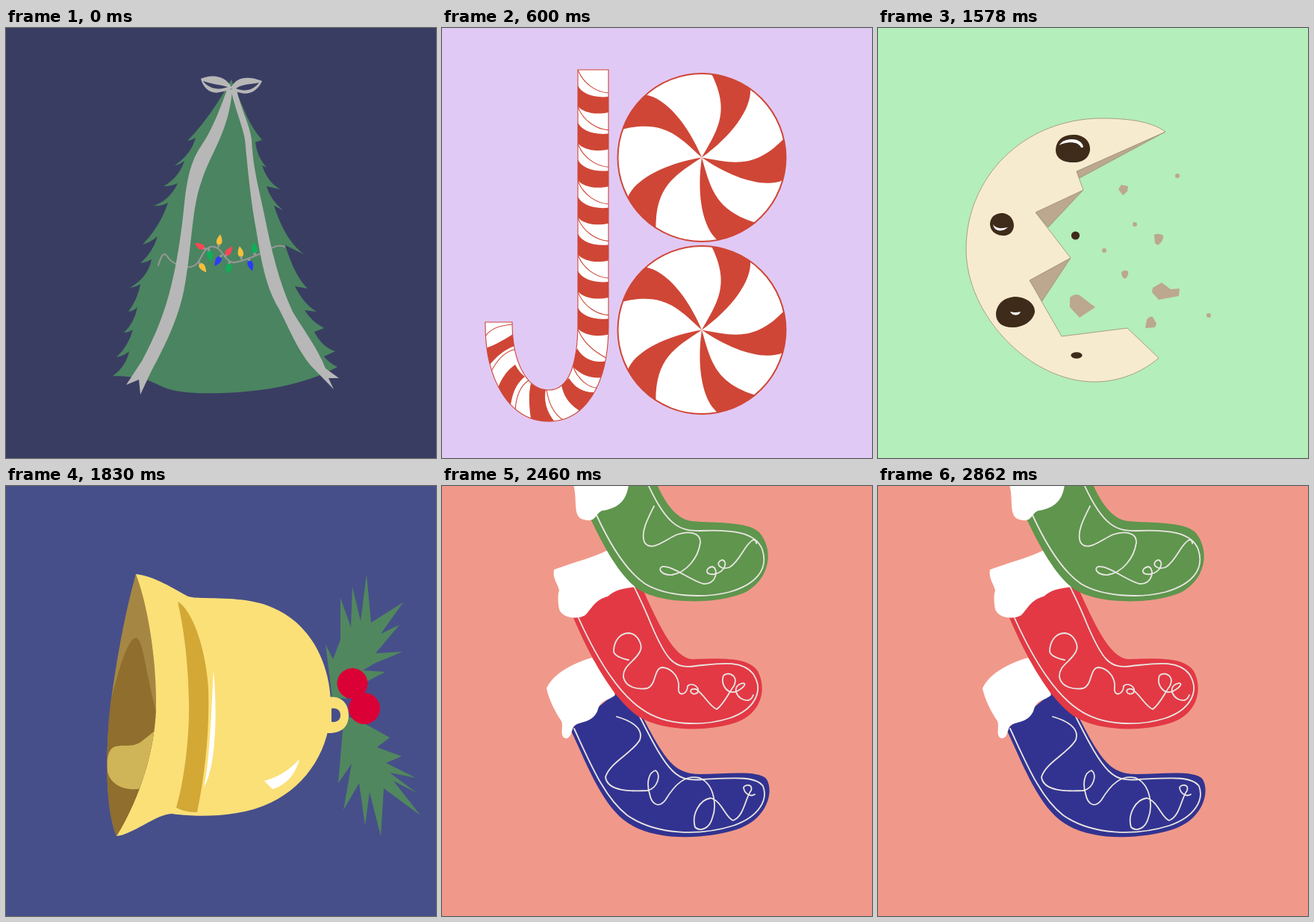
An HTML page that plays this animation: 576 px wide and 576 px high, repeating every 3.13 s.

```html
<!DOCTYPE html>
<html lang="en">
<head>
<meta charset="utf-8">
<title>Holiday cards</title>
<style>
html, body { margin: 0; width: 100%; height: 100%; overflow: hidden; }
svg { display: block; width: 576px; height: 576px; }
.scene { visibility: hidden; }
.scene:first-of-type { visibility: visible; }
.bg { width: 576px; height: 576px; }
.line { fill: none; stroke-linecap: round; stroke-linejoin: round; }
#tree .line { stroke: #979797; stroke-width: 2; }
#candy { fill: #cf4636; stroke: #cf4636; stroke-width: 0; }
#candy .line, #outline { stroke-width: 1.1; }
#socks .line { stroke: #e9e6e2; stroke-width: 1.8; }
</style>
</head>
<body>
<svg viewBox="0 0 576 576">
  <g class="scene" id="tree">
    <rect class="bg" fill="#393d62"/>
    <path fill="#4b8460" d="M302 69L292 86Q268 126 243 151Q249 150 254 147Q248 169 226 184Q233 183 239 178Q232 200 211 212Q221 212 230 208Q219 231 198 238Q209 239 217 234Q207 265 183 290Q194 287 203 279Q197 300 180 315Q188 314 195 310Q190 334 166 348Q174 347 180 343Q177 362 164 380Q171 379 176 374Q172 395 158 408Q164 408 170 404Q164 426 148 441Q158 439 165 433Q161 453 143 466C170 467 185 468 204 478C225 489 255 490 290 489C345 487 400 478 444 454Q433 449 426 440L441 433Q424 428 413 407L426 402Q409 393 400 378L416 380Q399 370 387 346L404 349Q387 333 374 291L399 303Q374 285 359 238L371 244Q354 230 349 212L367 216Q350 206 343 184L349 187Q336 172 334 153L343 150Q331 136 323 119L304 75Z"/>
    <path class="line" d="M204 318C208 305 211 299 216 306C222 316 238 321 248 320C262 317 261 297 274 293C290 291 291 312 304 314C315 314 328 307 342 302C355 296 361 289 373 293"/>
    <g id="bulbs"></g>
    <g fill="#b7b7b7">
      <path d="M297 80C288 105 277 135 262 157C246 180 243 205 240 225C236 265 231 305 222 342C214 378 199 415 182 446L161 478L178 471L180 491L193 463C215 422 233 385 240 342C249 290 249 240 262 205C275 165 298 140 303 84Z"/>
      <path d="M301 82C310 120 321 140 321 160C325 200 328 232 335 270C343 320 350 350 365 375C381 406 390 430 408 452L439 484L432 469L446 469L428 456C418 430 399 405 384 380C365 340 354 290 346 250C340 220 331 190 329 150C327 130 313 105 309 82Z"/>
      <path d="M302 79C294 64 276 61 261 68C264 81 275 89 286 86C294 85 298 83 302 81C320 94 336 87 343 71C325 64 309 65 302 79Z"/>
    </g>
    <path fill="#393d62" d="M264 71C274 75 288 76 297 79C285 84 271 81 264 71ZM308 81C318 74 329 76 339 73C332 83 320 86 308 81Z"/>
  </g>

  <g class="scene" id="candy">
    <rect class="bg" fill="#e1c9f5"/>
    <clipPath id="cane"><path id="outline" d="M182 56H223V400C223 480 190 527 143 527C90 527 57 470 58 394H94C94 450 115 485 143 485C170 485 182 450 182 394Z"/></clipPath>
    <g clip-path="url(#cane)">
      <rect class="bg" fill="#fff"/>
      <g id="stripes"></g>
      <path d="M181 429C190 445 205 449 221 446L216 468C200 470 185 465 174 452ZM170 469C178 482 190 489 206 488L186 514C172 505 163 495 160 478ZM119 476Q129 484 139 484C136 500 140 515 153 530H120C116 505 116 490 119 476ZM98 451Q104 462 111 467C98 478 94 490 91 512L72 490C78 472 85 460 98 451ZM55 430C72 425 85 416 97 409V426C85 430 72 440 60 456Z"/>
      <path class="line" d="M58 413C65 402 80 398 95 397M65 462C74 443 85 433 99 430M98 513C99 495 104 480 116 472M140 484C143 505 150 517 162 525M161 479C167 495 177 505 190 507M175 452C182 472 198 483 210 482"/>
    </g>
    <use href="#outline" fill="none"/>
    <g id="mints"></g>
  </g>

  <g class="scene" id="cookie">
    <rect class="bg" fill="#b4eeba"/>
    <g fill="#bca78f">
      <path d="M385 139L266 192L270 201ZM275 217L211 247L228 267ZM258 308L203 338L219 367Z" stroke="#9c8e78" stroke-width=".8"/>
      <path d="M322 216L326 210L335 212L334 219L328 224ZM370 277Q376 274 382 278Q383 285 375 291L371 288ZM326 327Q330 323 335 326Q336 332 331 336Q326 334 326 327ZM368 348L380 341L392 350L404 349L403 359L376 364L367 354ZM257 361Q264 355 270 358L291 374L270 388L257 374ZM360 391Q363 386 368 387L373 396L371 401L358 402Z"/>
      <circle cx="401" cy="198" r="3"/><circle cx="344" cy="263" r="3"/>
      <circle cx="303" cy="298" r="3"/><circle cx="443" cy="385" r="3"/>
    </g>
    <path fill="#f7ebcf" stroke="#a1977f" stroke-width=".9" d="M385 139C365 124 330 121 300 121C195 121 118 200 118 296C118 385 204 474 290 474C325 474 355 460 376 442L334 402L246 413L203 338L258 308L211 247L275 217L266 192Z"/>
    <g fill="#3e2b1a">
      <path d="M238 163C239 148 250 143 262 143C276 143 285 152 284 164C282 176 272 181 258 180C245 179 238 173 238 163ZM150 262C151 252 158 248 167 248C177 249 182 257 182 265C181 275 174 279 166 278C156 277 150 271 150 262ZM158 383C159 369 170 360 185 360C200 361 211 370 210 381C207 393 195 401 180 401C166 401 158 394 158 383Z"/>
      <circle cx="264.5" cy="278" r="5.6"/><ellipse cx="266" cy="438.5" rx="7.6" ry="4.2"/>
    </g>
    <path fill="#fff" d="M243 157C247 147 272 145 275 159Q274 161 272 160C268 151 252 152 243 157ZM154 263C158 269 166 269 174 267C168 273 156 274 154 263ZM177 380Q184 382 191 380C189 386 180 386 177 380Z"/>
  </g>

  <g class="scene" id="bell">
    <rect class="bg" fill="#474f8a"/>
    <path fill="#51875e" d="M437 284L428 212L438 232L448 206L448 150L462 189L464 135L475 181L483 118L489 183L532 156L502 198L527 186L495 224L531 222L493 238L478 247L508 249L483 262L455 285ZM452 316L445 398L463 372L452 434L473 398L481 455L487 410L502 469L506 405L555 441L519 395L550 411L514 384L549 391L509 371L530 362L497 350L514 337L480 318L456 308Z"/>
    <g fill="#db0035"><circle cx="464" cy="264.5" r="20.5"/><circle cx="480" cy="298" r="21"/></g>
    <g fill="#fbe078">
      <path d="M174 118C200 121 225 138 244 148C260 153 310 146 350 160C410 182 435 240 435 295C435 350 405 400 355 424C310 446 250 443 222 439C200 440 170 467 148 469Z"/>
      <path fill-rule="evenodd" d="M430 283C450 280 459 292 459 307C459 322 450 332 430 331ZM436 298V316C445 317 448 312 448 307C448 302 445 297 436 298Z"/>
    </g>
    <clipPath id="mouth"><path d="M174 118C190 160 201 230 201 290C201 345 183 412 148 469C132 430 133 350 141 285C148 235 158 175 174 118Z"/></clipPath>
    <g clip-path="url(#mouth)">
      <rect x="130" y="110" width="80" height="365" fill="#a58743"/>
      <path fill="#8f6e2e" d="M141 285C150 250 162 208 172 204C184 197 187 255 202 305V475H125V300Z"/>
      <path fill="#cfb557" d="M146 349C158 346 168 350 179 344L202 326V400L182 405C160 410 139 400 136 382C134 366 137 352 146 349Z"/>
    </g>
    <path fill="#d3a835" d="M230 155C245 162 266 205 271 270C273 330 266 390 256 437Q240 437 228 431C240 390 246 330 245 290C244 240 240 200 230 155Z"/>
    <path fill="#fff" d="M278 247C283 300 282 375 265 404C273 370 275 300 278 247ZM393 366C378 382 362 391 346 395L357 406C375 401 388 386 393 366Z"/>
  </g>

  <g class="scene" id="socks">
    <rect class="bg" fill="#f0998a"/>
    <g>
      <path fill="#323391" d="M172 326C192 368 212 422 243 447C280 477 350 474 395 460C435 447 445 410 435 393C425 380 380 386 345 386C312 385 300 370 268 308L232 278Z"/>
      <path class="line" d="M177 325C198 370 217 417 248 441C287 468 345 469 390 455C425 443 437 420 430 402C420 388 390 391 350 393C315 396 305 390 262 303M234 309C255 315 270 325 265 340C255 358 225 370 219 390C222 410 255 409 275 408C289 405 294 386 286 381C276 384 274 399 278 412C281 428 291 431 299 421C313 398 326 387 345 391C366 400 368 430 362 445C358 460 345 463 339 457C334 440 345 420 360 418C375 422 380 445 390 448C405 442 406 418 414 408C417 398 405 400 404 404C405 412 413 417 419 413"/>
      <path fill="#fff" d="M140 271C150 249 180 236 201 230C212 245 225 265 232 280C222 289 213 284 208 302C200 318 185 315 177 321C172 330 174 338 165 338C157 335 163 322 160 315C150 300 143 285 140 271Z"/>
    </g>
    <g>
      <path fill="#e23945" d="M174 172C188 205 222 280 262 308C293 328 350 330 390 318C425 308 437 275 423 248C410 228 370 231 335 232C310 230 290 185 266 132L220 140Z"/>
      <path class="line" d="M183 177C197 208 229 273 268 299C300 322 350 322 385 311C418 300 432 275 417 252C402 232 370 238 340 241C310 246 300 232 280 185C270 160 262 145 257 134M250 233C240 231 232 228 230 222C230 208 238 197 250 197C262 198 270 213 265 222C258 236 242 240 243 256C246 270 262 273 275 271C288 266 283 243 296 243C310 245 318 258 317 270C315 283 329 280 329 268C335 262 347 270 342 277C334 283 328 270 340 272C352 280 358 295 368 299C378 292 385 275 391 268C398 253 382 248 377 254C373 266 382 280 395 275C408 268 408 262 400 265C387 270 396 288 410 287Q415 286 417 280"/>
      <path fill="#fff" d="M150 112C180 101 202 96 222 86C235 100 250 115 259 135C245 138 235 137 222 148C205 152 200 165 192 173C180 180 160 176 157 165C155 155 155 145 157 140C155 130 148 125 150 112Z"/>
    </g>
    <g>
      <path fill="#5f954d" d="M198 42C215 78 236 118 262 138C297 160 370 158 405 143C440 125 445 85 425 62C410 47 365 50 335 47C315 45 300 25 288 -2H240Z"/>
      <path class="line" d="M207 39C224 76 247 114 272 131C300 148 350 151 385 142C420 132 438 112 429 85C420 62 390 58 345 60C320 60 302 55 276 -2M284 27C275 45 266 62 271 75C280 90 300 71 315 65C330 60 347 62 346 76C343 97 327 116 308 119C295 120 288 111 295 108C310 107 330 125 350 131C368 133 371 110 362 108C352 110 352 120 365 118C380 115 383 100 375 99C365 103 372 113 385 109C400 100 405 78 417 72Q421 72 421 77"/>
      <path fill="#fff" d="M176 -2C182 18 174 42 190 45C207 50 205 36 215 33C234 30 247 22 250 -2Z"/>
    </g>
  </g>
</svg>
<script>
const $ = s => document.querySelector(s);
const RED = '#fb4755', GOLD = '#f5bf3b', GREEN = '#0cb057', BLUE = '#2b3bf8';

// Base point, tip point, colour
const bulbs = [
  [265, 295, 252, 288, RED], [285, 290, 287, 277, GOLD], [272, 299, 275, 314, GREEN],
  [260, 316, 268, 327, GOLD], [287, 307, 280, 318, BLUE], [295, 304, 304, 291, RED],
  [299, 316, 297, 330, GREEN], [315, 306, 313, 293, GOLD], [333, 301, 332, 288, GREEN],
  [326, 312, 330, 326, BLUE]
];
$('#bulbs').innerHTML = bulbs.map(([x, y, tx, ty, color]) => {
  const turn = Math.atan2(ty - y, tx - x) * 180 / Math.PI;
  return `<g transform="translate(${x} ${y}) rotate(${turn})">
    <path d="M-4 0H1" stroke="#979797" stroke-width="3"/>
    <path fill="${color}" d="M0 -2.2C4 -5.5 9 -3 14 0C9 3 4 5.5 0 2.2Z"/></g>`;
}).join('');

const stripe = i => `<g transform="translate(0 ${i * 49.6})">
  <path d="M182 77C187 88 203 94 223 92V113C205 117 189 113 182 105Z"/>
  <path class="line" d="M182 56C189 74 206 86 223 87"/></g>`;
$('#stripes').innerHTML = [0, 1, 2, 3, 4, 5, 6].map(stripe).join('') +
  '<path class="line" d="M182 403C189 422 206 435 222 443"/>';

const petal = a => `<path transform="rotate(${a})"
  d="M0 0C22 -38 38 -62 13 -112A113 113 0 0 1 65 -92C67 -65 39 -28 0 0Z"/>`;
const mint = y => `<g transform="translate(348 ${y})">
  <circle r="112.5" fill="#fff" stroke-width="2"/>
  ${[0, 70.5, 134, 206.5, 283].map(petal).join('')}</g>`;
$('#mints').innerHTML = mint(173.5) + mint(404.5);

const scenes = [...document.querySelectorAll('.scene')];
const ends = [600, 1200, 1830, 2460, 3130];

function draw(now) {
  const t = now % 3130;
  const current = ends.findIndex(end => t < end);
  scenes.forEach((s, i) => s.style.visibility = i === current ? 'visible' : 'hidden');
  requestAnimationFrame(() => draw(performance.now()));
}
draw(performance.now());
</script>
</body>
</html>
```
